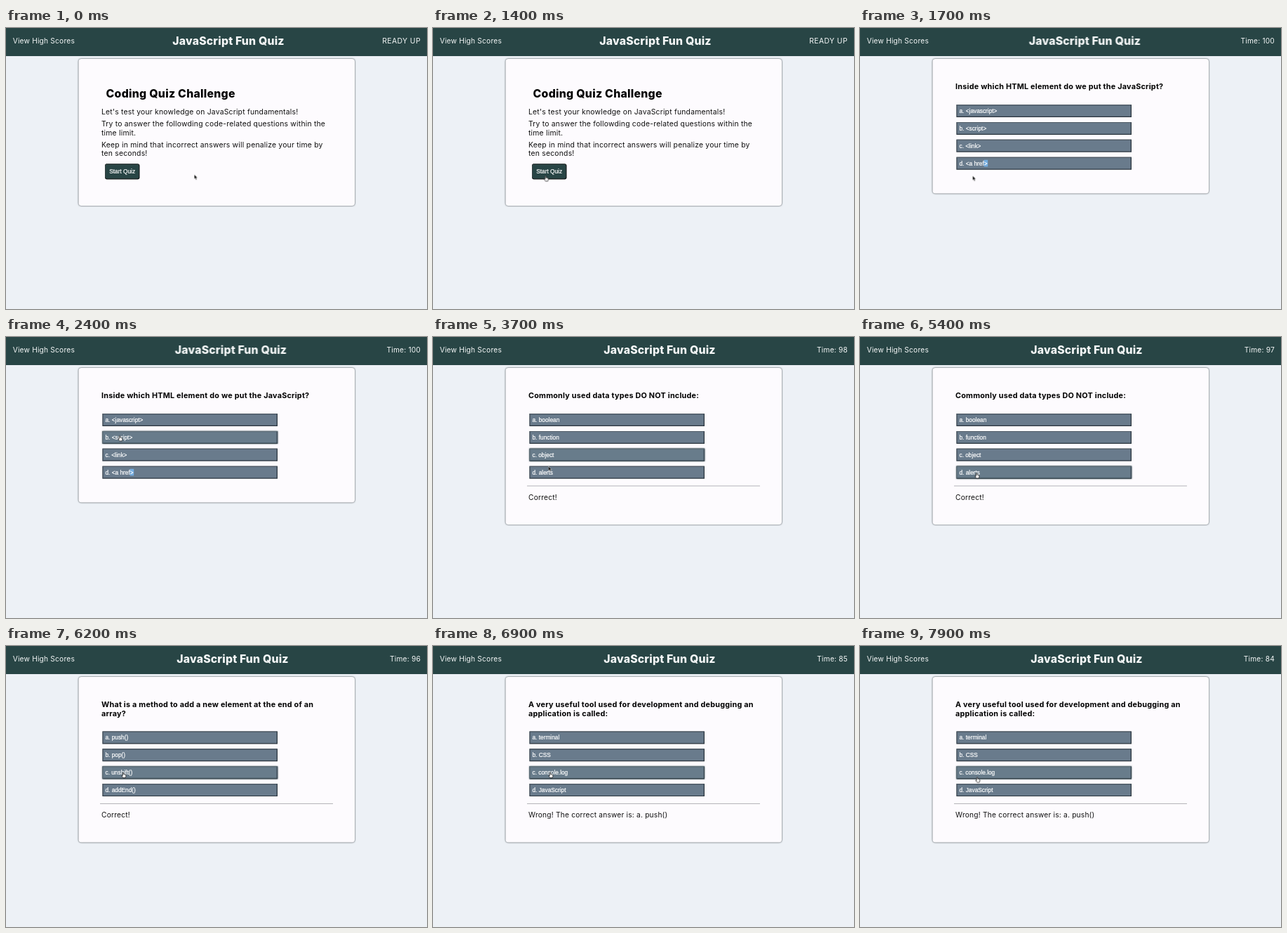
An HTML page for the animation above (8 s loop, 600 by 400 pixels).

```html
<!DOCTYPE html>
<html lang="en">
<head>
<meta charset="utf-8">
<title>JavaScript Fun Quiz</title>
<style>
html, body { margin: 0; width: 100%; height: 100%; overflow: hidden; background: #edf1f6; }
svg { display: block; width: 600px; height: 400px; }
text { font: 400 10.2px Inter, sans-serif; letter-spacing: .2px; fill: #111; white-space: pre; }
.bar text { fill: #f4f7f7; }
.time { fill: #f4f7f7; text-anchor: end; }
.ready { font-size: 10.4px; letter-spacing: .4px; }
.bar .title { font-weight: 800; font-size: 15.8px; letter-spacing: .18px; text-anchor: middle; }
.head { font-weight: 800; font-size: 15.8px; letter-spacing: .28px; fill: #000; }
.para { font-size: 10.4px; }
.ask { font-weight: 700; font-size: 10.8px; letter-spacing: .23px; fill: #000; }
.opt, .start { font: 8.3px "Liberation Sans", Arial, sans-serif; letter-spacing: 0; fill: #fff; stroke: #fff; stroke-width: .2; }
.card { fill: #fdfbfe; filter: drop-shadow(0 .6px 1px rgba(10, 20, 25, .85)); }
.rule { fill: #b4b4b8; }
.glow { fill: #687c8b; filter: drop-shadow(0 0 1.3px rgba(40, 68, 68, .85)); }

.step { animation: 8s step-end infinite; }
#intro { animation-name: intro; }
#q1 { animation-name: q1; }
#q2 { animation-name: q2; }
#q3 { animation-name: q3; }
#q4 { animation-name: q4; }
@keyframes intro { 0% { opacity: 1 } 18.75%, 100% { opacity: 0 } }
@keyframes q1 { 0%, 31.25%, 100% { opacity: 0 } 18.75% { opacity: 1 } }
@keyframes q2 { 0%, 68.75%, 100% { opacity: 0 } 31.25% { opacity: 1 } }
@keyframes q3 { 0%, 82.5%, 100% { opacity: 0 } 68.75% { opacity: 1 } }
@keyframes q4 { 0% { opacity: 0 } 82.5%, 100% { opacity: 1 } }

/* countdown */
.t99 { animation-name: t99; }
.t98 { animation-name: t98; }
.t97 { animation-name: t97; }
.t96 { animation-name: t96; }
.t95 { animation-name: t95; }
.t85 { animation-name: t85; }
.t84 { animation-name: t84; }
@keyframes t99 { 0% { opacity: 1 } 43.75%, 100% { opacity: 0 } }
@keyframes t98 { 0%, 56.25%, 100% { opacity: 0 } 43.75% { opacity: 1 } }
@keyframes t97 { 0% { opacity: 0 } 56.25%, 100% { opacity: 1 } }
@keyframes t96 { 0% { opacity: 1 } 81.25%, 100% { opacity: 0 } }
@keyframes t95 { 0% { opacity: 0 } 81.25%, 100% { opacity: 1 } }
@keyframes t85 { 0% { opacity: 1 } 93.75%, 100% { opacity: 0 } }
@keyframes t84 { 0% { opacity: 0 } 93.75%, 100% { opacity: 1 } }

.title { animation-name: shift; }
@keyframes shift {
  0% { transform: translateX(317px) }
  18.75% { transform: translateX(320.5px) }
  31.25%, 100% { transform: translateX(323px) }
}

/* hovered answers */
.h1 { animation-name: h1; }
.h2b { animation-name: h2b; }
.h2c { animation-name: h2c; }
.h2d { animation-name: h2d; }
.h3 { animation-name: h3; }
@keyframes h1 { 0% { opacity: 0 } 26.25%, 100% { opacity: 1 } }
@keyframes h2b { 0% { opacity: 1 } 39%, 100% { opacity: 0 } }
@keyframes h2c { 0%, 47.5%, 100% { opacity: 0 } 40% { opacity: 1 } }
@keyframes h2d { 0%, 57.5% { opacity: 0 } 47.5%, 63.5%, 100% { opacity: 1 } }
@keyframes h3 { 0% { opacity: 0 } 71.25%, 100% { opacity: 1 } }
.sel { fill: #74ade0; animation-name: sel; }
@keyframes sel { 0% { opacity: 0 } 20%, 100% { opacity: 1 } }

/* pointer */
#pointer { animation: move 8s linear infinite; }
@keyframes move {
  0% { transform: translate(268.5px, 208.5px) }
  4% { transform: translate(222px, 216px) }
  7.5% { transform: translate(176px, 213px) }
  10%, 21.25% { transform: translate(160.5px, 210.5px) }
  27.5%, 37.5% { transform: translate(162px, 140.5px) }
  41.25%, 43.75% { transform: translate(163.5px, 161px) }
  46.25%, 47.4% { transform: translate(164.5px, 184px) }
  50%, 56.25% { transform: translate(166px, 195px) }
  60% { transform: translate(166px, 209px) }
  66.25%, 68.75% { transform: translate(166px, 193.5px) }
  75%, 98.7% { transform: translate(167px, 180px) }
  98.75%, 100% { transform: translate(167px, 186.5px) }
}
.arrow { animation-name: arrow; }
.hand { animation-name: hand; }
@keyframes arrow {
  0%, 18.75%, 45.5%, 57.5%, 68.75% { opacity: 1 }
  7.5%, 22%, 47.5%, 63.5%, 71.25%, 100% { opacity: 0 }
}
@keyframes hand {
  0%, 18.75%, 45.5%, 57.5%, 68.75% { opacity: 0 }
  7.5%, 22%, 47.5%, 63.5%, 71.25%, 100% { opacity: 1 }
}
</style>
</head>
<body>
<svg viewBox="0 0 600 400">
  <defs>
    <g id="btn">
      <path fill="#2a343d" d="M0 0h249.5v18H0z"/>
      <path fill="#4f5b66" d="M0 18V0h249.5l-1.2 1.2H1.2v15.6z"/>
      <path fill="#697b8c" d="M1.2 1.2h247.1v15.6H1.2z"/>
    </g>
    <g id="lit">
      <path class="glow" d="M0 0h249.5v18H0z"/>
      <path fill="#36434c" d="M249.5 0v18H0l1.2-1.2h247.1V1.2z"/>
      <path fill="#5d6d77" d="M0 18V0h249.5l-1.2 1.2H1.2v15.6z"/>
    </g>
    <g id="list">
      <use href="#btn" x="137.5" y="109"/>
      <use href="#btn" x="137.5" y="133.9"/>
      <use href="#btn" x="137.5" y="158.8"/>
      <use href="#btn" x="137.5" y="183.7"/>
    </g>
    <path id="rule" class="rule" d="M134 211.6h332v1H134z"/>
  </defs>

  <path fill="#edf1f6" d="M0 0h600v400H0z"/>
  <g class="bar">
    <path fill="#284545" d="M0 0h600v40H0z"/>
    <text x="9.7" y="21.6">View High Scores</text>
    <text class="title step" y="24">JavaScript Fun Quiz</text>
  </g>

  <g id="intro" class="step">
    <text class="time ready" x="591" y="21.6">READY UP</text>
    <rect class="card" x="103.5" y="44" width="393.5" height="209" rx="4"/>
    <text class="head" x="142.6" y="99.2">Coding Quiz Challenge</text>
    <text class="para" x="136" y="123.3">Let's test your knowledge on JavaScript fundamentals!</text>
    <text class="para" x="136" y="140.3">Try to answer the followding code-related questions within the</text>
    <text class="para" x="136" y="152.7">time limit.</text>
    <text class="para" x="136" y="169.7">Keep in mind that incorrect answers will penalize your time by</text>
    <text class="para" x="136" y="182.1">ten seconds!</text>
    <rect fill="#0c1213" x="141" y="193.3" width="49.5" height="22.2" rx="3"/>
    <rect fill="#34403f" x="141" y="193.3" width="48.4" height="21" rx="2.8"/>
    <rect fill="#284545" x="142.1" y="194.4" width="47.2" height="19.8" rx="2.2"/>
    <text class="start" x="147.2" y="207.2">Start Quiz</text>
  </g>

  <g id="q1" class="step">
    <text class="time" x="591" y="21.6">Time: 100</text>
    <rect class="card" x="103.5" y="44" width="393.5" height="191.5" rx="4"/>
    <text class="ask" x="136" y="87.2">Inside which HTML element do we put the JavaScript?</text>
    <use href="#list"/>
    <use class="step h1" href="#lit" x="137.5" y="133.9"/>
    <rect class="step sel" x="176.6" y="187.8" width="5.6" height="9.6"/>
    <text class="opt" x="141.5" y="120.8">a. &lt;javascript&gt;</text>
    <text class="opt" x="141.5" y="145.7">b. &lt;script&gt;</text>
    <text class="opt" x="141.5" y="170.6">c. &lt;link&gt;</text>
    <text class="opt" x="141.5" y="195.5">d. &lt;a href&gt;</text>
  </g>

  <g id="q2" class="step">
    <text class="time step t99" x="591" y="21.6">Time: 99</text>
    <text class="time step t98" x="591" y="21.6">Time: 98</text>
    <text class="time step t97" x="591" y="21.6">Time: 97</text>
    <rect class="card" x="103.5" y="44" width="393.5" height="223" rx="4"/>
    <text class="ask" x="136" y="87.2">Commonly used data types DO NOT include:</text>
    <use href="#list"/>
    <use class="step h2b" href="#lit" x="137.5" y="133.9"/>
    <use class="step h2c" href="#lit" x="137.5" y="158.8"/>
    <use class="step h2d" href="#lit" x="137.5" y="183.7"/>
    <text class="opt" x="141.5" y="120.8">a. boolean</text>
    <text class="opt" x="141.5" y="145.7">b. function</text>
    <text class="opt" x="141.5" y="170.6">c. object</text>
    <text class="opt" x="141.5" y="195.5">d. alerts</text>
    <use href="#rule"/>
    <text x="136" y="231.6">Correct!</text>
  </g>

  <g id="q3" class="step">
    <text class="time step t96" x="591" y="21.6">Time: 96</text>
    <text class="time step t95" x="591" y="21.6">Time: 95</text>
    <rect class="card" x="103.5" y="44" width="393.5" height="235.4" rx="4"/>
    <text class="ask" x="136" y="87.2">What is a method to add a new element at the end of an</text>
    <text class="ask" x="136" y="99.6">array?</text>
    <g transform="translate(0 12.4)">
      <use href="#list"/>
      <use class="step h3" href="#lit" x="137.5" y="158.8"/>
      <text class="opt" x="141.5" y="120.8">a. push()</text>
      <text class="opt" x="141.5" y="145.7">b. pop()</text>
      <text class="opt" x="141.5" y="170.6">c. unshift()</text>
      <text class="opt" x="141.5" y="195.5">d. addEnd()</text>
      <use href="#rule"/>
      <text x="136" y="231.6">Correct!</text>
    </g>
  </g>

  <g id="q4" class="step">
    <text class="time step t85" x="591" y="21.6">Time: 85</text>
    <text class="time step t84" x="591" y="21.6">Time: 84</text>
    <rect class="card" x="103.5" y="44" width="393.5" height="235.4" rx="4"/>
    <text class="ask" x="136" y="87.2">A very useful tool used for development and debugging an</text>
    <text class="ask" x="136" y="99.6">application is called:</text>
    <g transform="translate(0 12.4)">
      <use href="#list"/>
      <use href="#lit" x="137.5" y="158.8"/>
      <text class="opt" x="141.5" y="120.8">a. terminal</text>
      <text class="opt" x="141.5" y="145.7">b. CSS</text>
      <text class="opt" x="141.5" y="170.6">c. console.log</text>
      <text class="opt" x="141.5" y="195.5">d. JavaScript</text>
      <use href="#rule"/>
      <text x="136" y="231.6">Wrong! The correct answer is: a. push()</text>
    </g>
  </g>

  <g id="pointer">
    <path class="step arrow" d="M0 0v6.4l1.4-1.3 1 2.3 1.2-.5-1-2.2h1.9z" fill="#000" stroke="#fff" stroke-width=".5"/>
    <path class="step hand" d="M-.7 .5q.7-.9 1.4 0v2.2q3 0 3.2 1.3v1.6L3.1 7.6H-.2L-2.2 4.8q-.2-1 1.5-.2z" fill="#fff" stroke="#111" stroke-width=".7"/>
  </g>
</svg>
</body>
</html>
```
